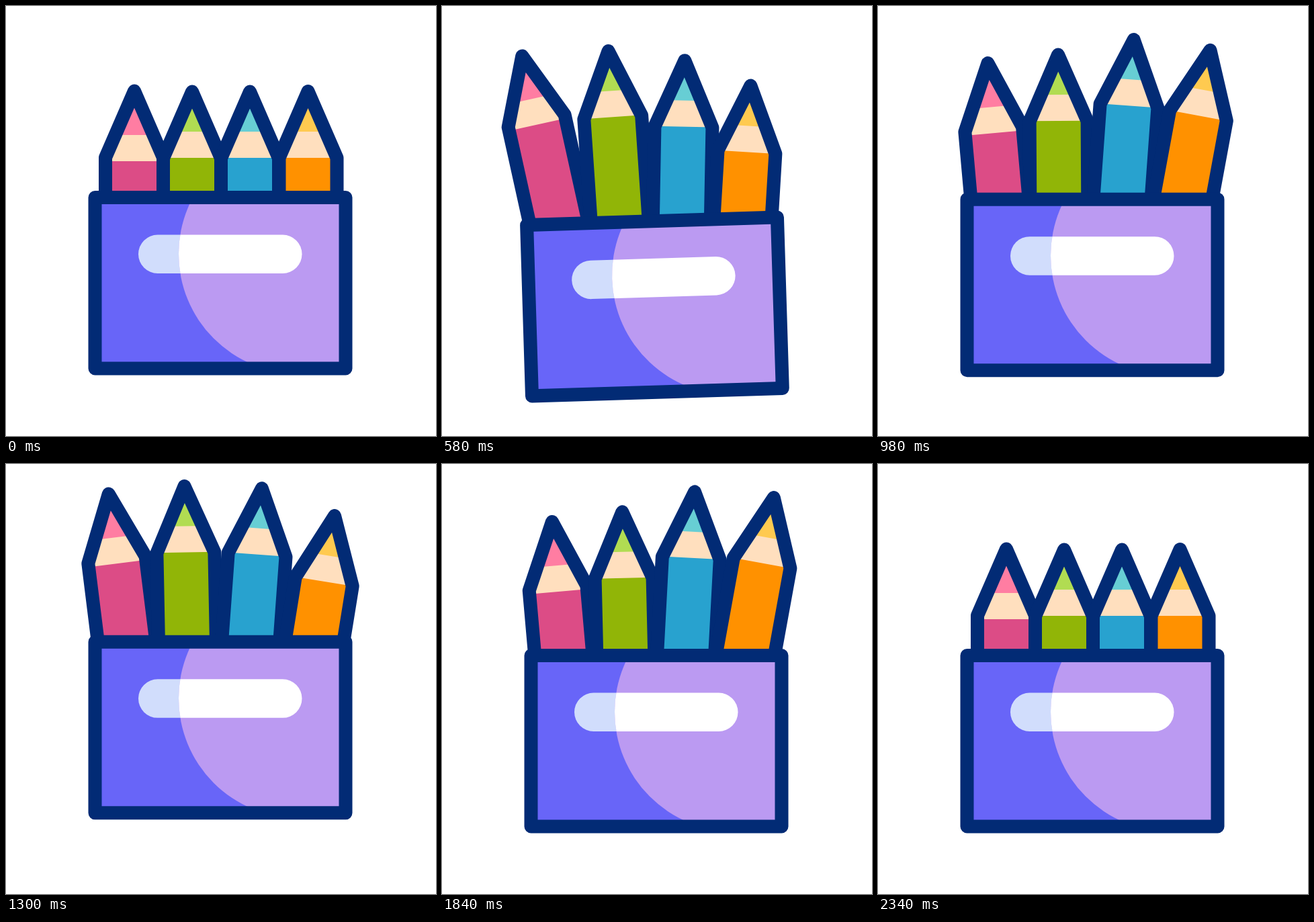
An HTML page with a canvas that plays this animation: 640x640 px, repeating every 2860 ms.

```html
<!DOCTYPE html>
<html lang="en">
<head>
<meta charset="utf-8">
<title>Box of pencils</title>
<style>
  html, body { margin: 0; width: 100%; height: 100%; overflow: hidden; background: #fff; }
  canvas { display: block; width: 640px; height: 640px; }
</style>
</head>
<body>
<canvas id="stage" width="640" height="640"></canvas>
<script>
const LOOP = 2860;
const NAVY = '#022b75';
const SINK = 8; // how far a pencil drops below rest before it settles
const ctx = document.getElementById('stage').getContext('2d');

// lift and tilt: first peak, dip, second peak. reach and slide carry the tip sideways.
const pencils = [
  { x: 191, y: 126.5, wood: 65.5, tip: '#ff7da2', body: '#dc4c86', delay: 0,
    lift: [94, 44, 80], tilt: [-10.8, -5.1, -9.1], reach: 310, slide: 0 },
  { x: 277, y: 127.5, wood: 59.5, tip: '#b1dc52', body: '#91b507', delay: 30,
    lift: [102, 57, 98], tilt: [-2.2, -0.3, -2.2], reach: 0, slide: -0.155 },
  { x: 363, y: 127.5, wood: 59.5, tip: '#67ced4', body: '#28a2cf', delay: 125,
    lift: [113, 62, 115], tilt: [4, 4.2, 4], reach: 245, slide: 0 },
  { x: 449.5, y: 127, wood: 60, tip: '#ffca50', body: '#ff9100', delay: 190,
    lift: [84, 28, 91], tilt: [11.2, 9.1, 12], reach: 248, slide: 0 }
];

// Sine ease from each value to the next; holds before the first and after the last
function ease(t, times, values) {
  return times.slice(1).reduce((value, end, i) => {
    const u = Math.min(Math.max((t - times[i]) / (end - times[i]), 0), 1);
    return value + (values[i + 1] - values[i]) * (1 - Math.cos(Math.PI * u)) / 2;
  }, values[0]);
}

const radians = degrees => degrees * Math.PI / 180;

function rect(color, x, y, w, h) {
  ctx.fillStyle = color;
  ctx.fillRect(x, y, w, h);
}

function drawPencil({ x, y, wood, tip, body, delay, lift, tilt, reach, slide }, t) {
  const times = [195 + delay, 605 + delay, 965 + 1.5 * delay,
    1640 + delay / 2, 2070 + delay / 2, 2245 + delay / 2];
  const rise = ease(t, times, [0, ...lift, -SINK, 0]);
  const angle = radians(ease(t, times, [0, ...tilt, 0, 0]));
  const paint = wood + 39;
  const outline = new Path2D('M-43 330V99L0 0L43 99V330Z');
  ctx.save();
  ctx.translate(x + reach * Math.sin(angle) + slide * rise, y - rise);
  ctx.rotate(angle);
  ctx.save();
  ctx.clip(outline);
  rect(tip, -43, 0, 86, wood + 1);
  rect('#ffdfbe', -43, wood, 86, 40);
  rect(body, -43, paint, 86, 330 - paint);
  ctx.restore();
  ctx.stroke(outline);
  ctx.restore();
}

function fillPill(color) {
  ctx.fillStyle = color;
  ctx.beginPath();
  ctx.roundRect(197, 340.5, 243.5, 57.5, 28.75);
  ctx.fill();
}

function drawBox() {
  const frame = [132.5, 285, 373, 254.5];
  rect('#6865f8', ...frame);
  fillPill('#d1ddfc');
  ctx.save();
  ctx.beginPath();
  ctx.arc(435, 369, 178, 0, 2 * Math.PI);
  ctx.clip();
  rect('#bb9af2', ...frame);
  fillPill('#fff');
  ctx.restore();
  ctx.strokeRect(...frame);
}

function draw(t) {
  const drop = ease(t, [140, 350, 700, 1170, 1560], [0, -30, 58, -27, 0]);
  const tilt = ease(t, [140, 690, 980], [0, -1.95, 0]);
  rect('#fff', 0, 0, 640, 640);
  ctx.save();
  ctx.translate(319, 495 + drop);
  ctx.rotate(radians(tilt));
  ctx.translate(-319, -495);
  ctx.strokeStyle = NAVY;
  ctx.lineWidth = 20;
  ctx.lineJoin = 'round';
  pencils.forEach(pencil => drawPencil(pencil, t));
  drawBox();
  ctx.restore();
}

const start = performance.now();
function tick() {
  draw((performance.now() - start) % LOOP);
  requestAnimationFrame(tick);
}
tick();
</script>
</body>
</html>
```
